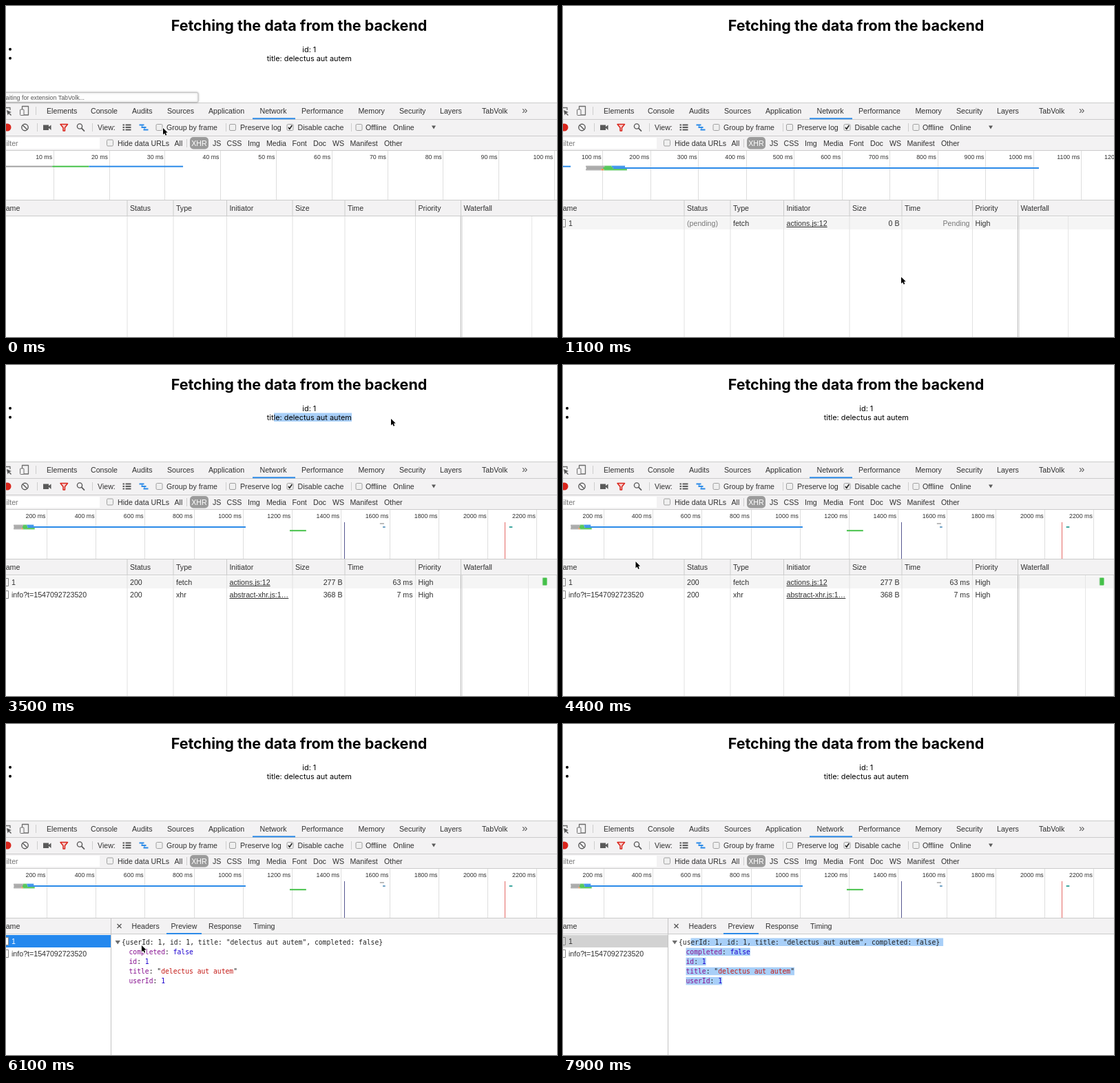
Write an HTML page with a canvas that moves like this. It is 800 px wide and 480 px high and loops after 8000 ms.

```html
<!DOCTYPE html>
<html lang="en">
<head>
<meta charset="utf-8">
<title>Fetching the data from the backend</title>
<style>
html, body { margin: 0; width: 100%; height: 100%; overflow: hidden; background: #fff; }
canvas { display: block; }
</style>
</head>
<body>
<canvas id="stage" width="800" height="480"></canvas>
<script>
const c = document.getElementById('stage').getContext('2d');
const SANS = '"Liberation Sans", Arial, sans-serif';
const MONO = '"DejaVu Sans Mono", monospace';
const PAGE = 'Inter, sans-serif';
const UI = 10.65, INK = '#303030', BLUE = '#2b8ae8', GREEN = '#45c14a', GRAY = '#a3a3a3';
const BAR = '#f3f2f3', EDGE = '#cbcbcb', SELECT = '#a8cff8';

function rect(x, y, w, h, color) {
  c.fillStyle = color;
  c.fillRect(x, y, w, h);
}

// y is the middle of the capital letters
function text(s, x, y, color = INK, size = UI, align = 'left', font = SANS, weight = '') {
  c.font = `${weight} ${size}px ${font}`;
  c.textAlign = align;
  c.fillStyle = color;
  c.fillText(s, x, y + size * .36);
  return c.measureText(s).width;
}

function shape(points, fill, stroke, width = 1) {
  c.beginPath();
  points.forEach(([x, y]) => c.lineTo(x, y));
  if (fill) { c.closePath(); c.fillStyle = fill; c.fill(); }
  if (stroke) { c.strokeStyle = stroke; c.lineWidth = width; c.stroke(); }
}

function circle(x, y, r, fill, stroke, width = 1.4) {
  c.beginPath();
  c.arc(x, y, r, 0, 7);
  if (fill) { c.fillStyle = fill; c.fill(); }
  if (stroke) { c.strokeStyle = stroke; c.lineWidth = width; c.stroke(); }
}

function box(x, y, w, h, r, fill, stroke) {
  c.beginPath();
  c.roundRect(x, y, w, h, r);
  c.fillStyle = fill;
  c.fill();
  if (stroke) { c.strokeStyle = stroke; c.lineWidth = 1; c.stroke(); }
}

function checkbox(x, y, on) {
  box(x - 4.5, y - 4.5, 9, 9, 1.5, '#f0f0f0', '#a0a0a0');
  if (on) shape([[x - 2.5, y], [x - .7, y + 2.4], [x + 2.8, y - 3]], null, '#222', 1.6);
}

// Values at t from keyframes [time, ...values]
function along(keys, t, ease = u => u) {
  const i = keys.findIndex(k => k[0] > t);
  if (i < 0) return keys[keys.length - 1].slice(1);
  const a = keys[i - 1], b = keys[i], u = ease((t - a[0]) / (b[0] - a[0]));
  return a.slice(1).map((v, j) => v + (b[j + 1] - v) * u);
}

const smooth = u => u * u * (3 - 2 * u);
const MOVES = [
  [0, 228, 177], [300, 228, 177], [1000, 491, 393], [1100, 491, 393], [1500, 440, 180],
  [1800, 442, 180], [2000, 459, 131], [2200, 459, 131], [2700, 389, 74], [3400, 559, 78],
  [3700, 559, 78], [4600, 40, 315], [4800, 40, 315], [5300, 217, 332], [5800, 217, 332],
  [6300, 186, 315], [6700, 310, 425], [6900, 300, 385], [7000, 300, 385], [7200, 300, 361],
  [7500, 530, 345], [7800, 228, 177], [8000, 228, 177]
];
const DRAG_START = 6400, DRAG_END = 6900;
const pointer = t => along(MOVES, t, smooth);

function page(t) {
  const loading = t >= 200 && t < 1000;
  if (!loading) text('Fetching the data from the backend', 425.5, 28, '#000', 21.5, 'center', PAGE, 'bold');
  if (t < 200 || t >= 1300) {
    if (t >= 2700 && t < 3900) rect(389, 69.5, Math.min(pointer(t)[0], 502) - 389, 12.5, SELECT);
    [['id: 1', 62.8], ['title: delectus aut autem', 75.8]].forEach(([s, y]) => {
      circle(6, y, 2, '#000');
      text(s, 440.3, y, '#000', 10.9, 'center', PAGE);
    });
  }
}

function statusPopup(t) {
  if (t >= 300) return;
  c.save();
  c.shadowColor = 'rgba(0,0,0,.25)';
  c.shadowBlur = 3;
  box(-10, 125.5, 289, 14, 2, '#fdfdfd', '#c4c4c4');
  c.restore();
  text('Waiting for extension TabVolk...', -8.5, 132.5, '#555', 8.8);
}

const labels = (list, y) => list.forEach(([s, x]) => text(s, x, y));
const divider = (x, y) => rect(x, y - 6, 1, 12, '#cdcdcd');

function tabs(t) {
  rect(0, 140, 800, 70, BAR);
  [140, 164, 188, 209].forEach(y => rect(0, y, 800, 1, EDGE));
  if (t >= 1900 && t <= 2000) rect(419, 141, 81, 23, '#e5e5e5');
  labels([['Elements', 59], ['Console', 123], ['Audits', 183], ['Sources', 234], ['Application', 294],
    ['Network', 368.5], ['Performance', 429], ['Memory', 511.5], ['Security', 571],
    ['Layers', 630], ['TabVolk', 691]], 152);
  text('»', 749, 151, '#555', 15);
  rect(358, 162.3, 62, 2, BLUE);
  shape([[-1, 147.5], [6, 147.5], [6, 151]], null, '#6e6e6e', 1.3);
  shape([[1, 151], [8, 154], [5, 155], [8, 158], [7, 159], [4, 156], [2.5, 158.5]], '#555');
  c.strokeStyle = '#6e6e6e';
  c.lineWidth = 1.3;
  c.strokeRect(23.5, 145.5, 9, 12.5);
  box(20.5, 150, 5.5, 8.5, 1, BAR, '#6e6e6e');
  divider(43, 152);
}

function toolbar() {
  circle(2, 176, 5.5, '#d9251c');
  circle(27.5, 176, 4.7, null, '#5a5a5a');
  shape([[24.2, 172.7], [30.8, 179.3]], null, '#5a5a5a', 1.4);
  [45, 125, 319, 501].forEach(x => divider(x, 176));
  rect(54, 172.5, 8, 7.5, '#5a5a5a');
  shape([[61, 176], [65.5, 172.5], [65.5, 180]], '#5a5a5a');
  shape([[79, 171.5], [89.5, 171.5], [85.5, 176.5], [85.5, 181], [83, 181], [83, 176.5]], '#f7cfcd', '#d9251c', 1.5);
  circle(107, 174.5, 3.6, null, '#5a5a5a');
  shape([[109.6, 177.2], [114, 181.6]], null, '#5a5a5a', 1.7);
  [171.5, 175, 178.5].forEach((y, i) => {
    rect(169.5, y, 2.5, 2, '#5a5a5a');
    rect(173.5, y, 8, 2, '#5a5a5a');
    rect(193.5 + i * 3, y, 7, 2, BLUE);
  });
  rect(197, 172, 1, 5, BLUE);
  rect(200.5, 175, 1, 5, BLUE);
  [222.5, 329, 412.5, 512.5].forEach(x => checkbox(x, 176, x === 412.5));
  labels([['View:', 133], ['Group by frame', 233], ['Preserve log', 340], ['Disable cache', 423.5],
    ['Offline', 522], ['Online', 562]], 176.5);
  shape([[618, 173.5], [624, 173.5], [621, 178.5]], '#5a5a5a');

  rect(0, 191, 136, 16, '#fff');
  text('Filter', -6, 199, '#777');
  checkbox(151, 198.5);
  labels([['Hide data URLs', 162], ['All', 244.5], ['JS', 300], ['CSS', 320.5], ['Img', 351], ['Media', 378],
    ['Font', 415.5], ['Doc', 446], ['WS', 474], ['Manifest', 499.5], ['Other', 549]], 199);
  divider(262, 199);
  box(267, 190, 27, 17.5, 5, '#9b9b9b');
  text('XHR', 280.5, 199, '#fff', UI, 'center');
}

// [y, then start, end, colour of each part], in load time
const BARS = [
  [231.7, 0, 9.8, GRAY, 9.8, 16.4, GREEN, 16.4, 33.3, BLUE],
  [231.7, 65, 104, GRAY, 104, 119, GREEN, 119, 147, BLUE],
  [234, 66, 101, GRAY, 101, 122, GREEN, 122, 1012, BLUE],
  [236.3, 65, 97, GRAY, 97, 103, '#e8823a', 103, 151, GREEN],
  [239.2, 1192, 1259, GREEN],
  [229, 1560, 1577, '#bbb'],
  [234, 1572, 1582, '#6a9fc4'],
  [234, 2088, 2101, '#41a7a0']
];

function timeline(t) {
  const [span] = along([[0, 100.5], [1100, 1169], [2000, 2283]], t);
  const k = 812 / span, now = span - 50, at = ms => ms * k - 12;
  let step = 10 ** Math.ceil(Math.log10(64 / k));
  if (step * k >= 320) step /= 5;
  if (step * k >= 128) step /= 2;
  rect(0, 210, 800, 71, '#fff');
  for (let ms = step; at(ms) < 840; ms += step) {
    rect(Math.round(at(ms)), 210, 1, 71, '#dedede');
    text(ms + ' ms', at(ms) - 1.7, 218.5, INK, 8.8, 'right');
  }
  for (const [y, ...parts] of BARS)
    for (let i = 0; i < parts.length; i += 3) {
      const [a, b, color] = parts.slice(i, i + 3);
      if (a < now) rect(at(a), y, (Math.min(b, now) - a) * k, 2, color);
    }
  if (now > 1416) rect(Math.floor(at(1416)), 228, 1, 53, '#55578f');
  if (now > 2071) rect(Math.floor(at(2071)), 228, 1, 53, '#e56a66');
}

function fileIcon(y) {
  c.strokeStyle = '#8a8a8a';
  c.lineWidth = 1;
  c.strokeRect(-4, y - 5.5, 7.5, 11);
}

function row(y, cells, pending) {
  const dim = pending ? '#777' : INK;
  const [status, type, file, size, time] = cells;
  text(status, 180, y, dim);
  text(type, 247, y);
  const w = text(file, 324.5, y);
  rect(324.5, y + 5, w, 1, INK);
  text(size, 488.5, y, INK, UI, 'right');
  text(time, 590.5, y, dim, UI, 'right');
  text('High', 598.5, y);
}

function table(t) {
  const done = t >= 1300, second = t >= 1600;
  if (t >= 1000) rect(0, 306, 800, 18, '#f5f5f5');
  const heads = [['Status', 175.5], ['Type', 242.5], ['Initiator', 320], ['Size', 415.5], ['Time', 491.5],
    ['Priority', 594], ['Waterfall', 660]];
  heads.forEach(([s, x]) => {
    text(s, x + 4.4, 293);
    rect(x, 282, 1, 23, EDGE);
    rect(x, 305, 1, 175, x === 660 ? '#b5b5b5' : '#e2e2e2');
  });
  rect(662, 305, 1, 175, '#dedede');
  rect(t < 1000 ? 763 : done ? 758 : 733, 305, 1, 175, '#e6e6e6');
  if (done) rect(799, 305, 1, 175, '#e2e2e2');
  if (t >= 1000) {
    row(315, done ? ['200', 'fetch', 'actions.js:12', '277 B', '63 ms']
      : ['(pending)', 'fetch', 'actions.js:12', '0 B', 'Pending'], !done);
  }
  if (done) {
    box(779, 308.5, 6.5, 11, 1, GREEN);
    rect(778.5, 308.5, 1, 11, '#b6d9b7');
  }
  if (second) row(333, ['200', 'xhr', 'abstract-xhr.js:1…', '368 B', '7 ms']);
}

const KEY = '#881391', NUM = '#1c00cf', STR = '#c41a16', DARK = '#222';
const JSON_LINES = [
  [[`{userId: 1, id: 1, title: "delectus aut autem", completed: false}`, DARK]],
  [['completed', KEY], [': ', DARK], ['false', NUM]],
  [['id', KEY], [': ', DARK], ['1', NUM]],
  [['title', KEY], [': "', DARK], ['delectus aut autem', STR], ['"', DARK]],
  [['userId', KEY], [': ', DARK], ['1', NUM]]
];

function preview(t) {
  rect(153, 305, 647, 175, '#fff');
  rect(152, 282, 1, 198, '#c4c4c4');
  shape([[161.5, 290], [167.5, 296]], null, '#555', 1.3);
  shape([[167.5, 290], [161.5, 296]], null, '#555', 1.3);
  labels([['Headers', 182.5], ['Preview', 239.5], ['Response', 294], ['Timing', 359]], 293);
  rect(233, 303, 51, 2, BLUE);
  shape([[158.5, 314], [166, 314], [162.2, 319.5]], '#6e6e6e');
  c.font = `9.7px ${MONO}`;
  const unit = c.measureText('0').width;
  // The selection keeps its extent once the button is released
  const [mx, my] = pointer(Math.min(t, DRAG_END));
  JSON_LINES.forEach((parts, i) => {
    const y = 316.5 + i * 14.1;
    let x = i ? 178.5 : 168;
    const end = x + unit * parts.map(p => p[0]).join('').length;
    const from = i ? x : 185.5;
    if (t >= DRAG_START && my >= y - 7) {
      const below = my > y + 7;
      const to = below ? end + (i ? 0 : 5) : Math.max(from, Math.min(mx, end));
      rect(from, y - 6, to - from, 11.5, SELECT);
    }
    for (const [s, color] of parts) x += text(s, x, y, color, 9.7, 'left', MONO);
  });
}

function requests(t) {
  rect(0, 281, 800, 199, '#fff');
  rect(0, 281, 800, 24, BAR);
  rect(0, 281, 800, 1, EDGE);
  rect(0, 304, 800, 1, EDGE);
  const open = t >= 4700, active = open && t < DRAG_START;
  if (open) {
    rect(0, 306, 152, 18, active ? '#2488ee' : '#d2d2d2');
    preview(t);
  } else table(t);
  text('Name', -8, 293);
  if (t >= 1000) {
    if (active) rect(-4, 309.5, 7.5, 11, '#fff');
    fileIcon(315);
    text('1', 8, 315, active ? '#fff' : INK);
  }
  if (t >= 1600) {
    fileIcon(333);
    text('info?t=1547092723520', 8, 333);
  }
}

function tooltip(t) {
  if (t < 1800 || t > 2000) return;
  c.globalAlpha = t < 2000 ? .9 : .4;
  box(403.5, 191.5, 198, 17, 1, '#f4f4f4', '#c4c4c4');
  text('Disable cache (while DevTools is open)', 411, 200, '#555');
  c.globalAlpha = 1;
}

function cursor(t) {
  if (t >= 7900) return;
  const [x, y] = pointer(t);
  c.lineJoin = 'round';
  if (t >= 2000 && t <= 2200) {
    const arrows = [[0, -6], [3.2, -2.5], [.8, -2.5], [.8, 2.5], [3.2, 2.5], [0, 6],
      [-3.2, 2.5], [-.8, 2.5], [-.8, -2.5], [-3.2, -2.5]].map(([a, b]) => [x + a, y + b]);
    shape(arrows, '#000');
    return;
  }
  const arrow = [[0, 0], [0, 9.4], [2.2, 7.4], [3.7, 10.8], [5.3, 10.1], [3.9, 6.7], [6.7, 6.6]]
    .map(([a, b]) => [x + a, y + b]);
  shape([...arrow, arrow[0]], '#fff', '#fff', 1.6);
  shape(arrow, '#000');
}

function draw() {
  const t = Math.floor(performance.now() % 8000 / 100) * 100;
  rect(0, 0, 800, 480, '#fff');
  page(t);
  tabs(t);
  toolbar();
  timeline(t);
  requests(t);
  statusPopup(t);
  tooltip(t);
  cursor(t);
  requestAnimationFrame(draw);
}
draw();
</script>
</body>
</html>
```
